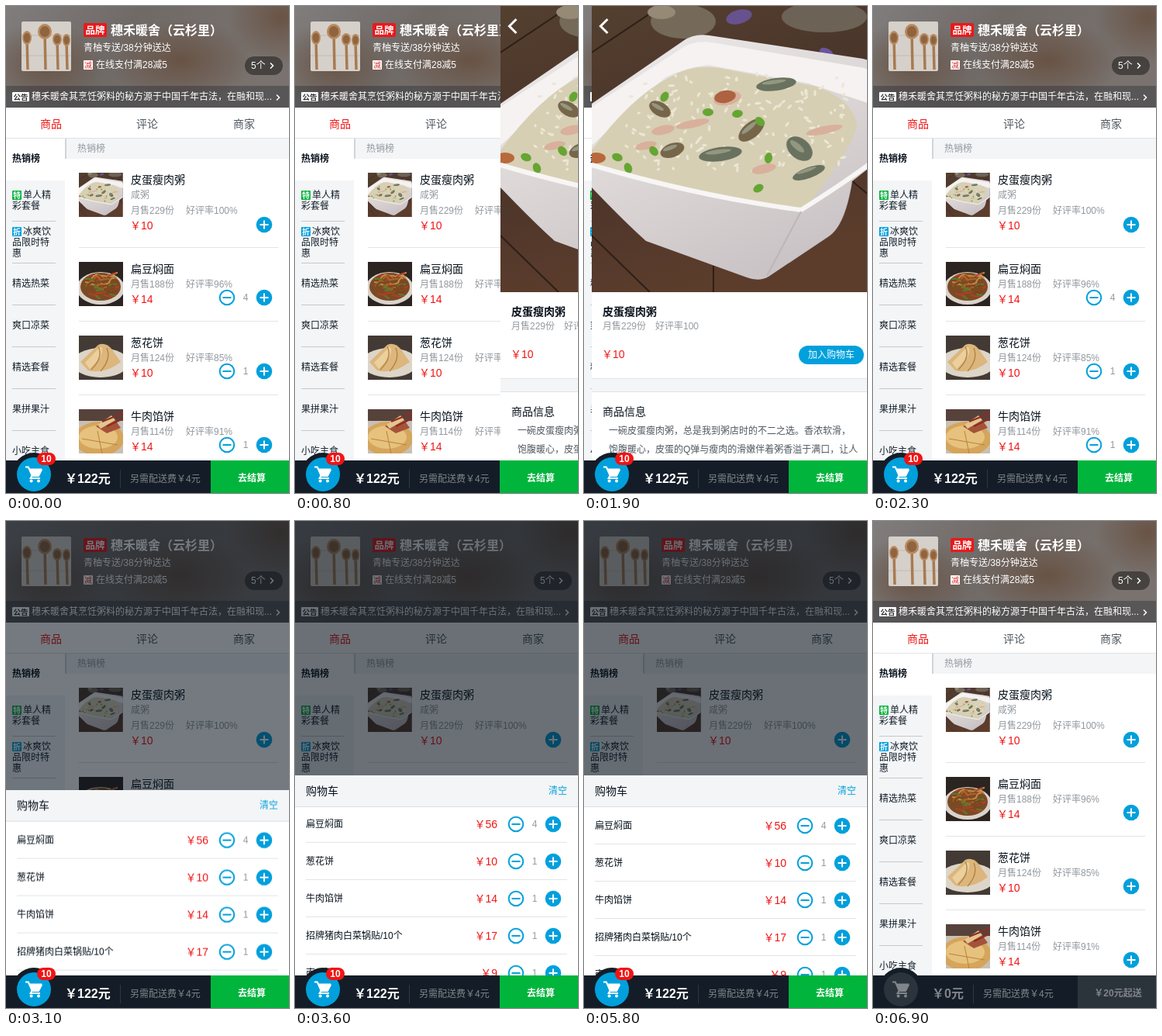
Write an HTML page that moves like this. It is 365 by 628 pixels and loops after 7.5 s.

```html
<!DOCTYPE html>
<html lang="zh-CN">
<head>
<meta charset="utf-8">
<title>外卖点餐</title>
<style>
html, body { margin: 0; width: 100%; height: 100%; overflow: hidden; background: #fff; }
svg { display: block; }
text { font-family: "Liberation Sans", "Noto Sans CJK SC", "Noto Sans CJK JP", sans-serif; white-space: pre; }
.b { font-weight: 700; }
.m { text-anchor: middle; }
.e { text-anchor: end; }

.detail, .mask, .cart, .rows, .full, .empty, .n0, .n1, .n2, .fly, .drop {
  animation: 7.5s linear infinite;
}
.detail { animation-name: detail; }
.mask { animation-name: mask; }
.cart { animation-name: cart; }
.rows { animation-name: rows; }
.full, .empty, .n0, .n1, .n2 { animation-timing-function: step-end; }
.full { animation-name: full; }
.empty { animation-name: empty; }
.n0 { animation-name: n0; }
.n1 { animation-name: n1; }
.n2 { animation-name: n2; }
.fly { opacity: 0; animation-name: fly; }
.drop { animation-name: drop; }
.second, .second .drop { animation-delay: .4s; }

@keyframes detail {
  0%, 9.2% { transform: translateX(365px); }
  14.6%, 25.2% { transform: none; }
  30.6%, 100% { transform: translateX(365px); }
}
@keyframes mask {
  0% { opacity: 0; }
  36.86% { opacity: 0; animation-timing-function: ease; }
  43.53% { opacity: 1; }
  87.95% { opacity: 1; animation-timing-function: ease-out; }
  91.85%, 100% { opacity: 0; }
}
@keyframes cart {
  0% { transform: translateY(258px); }
  36.86% { transform: translateY(258px); animation-timing-function: ease; }
  43.53%, 87.95% { transform: none; }
  87.96% { transform: translateY(217px); animation-timing-function: ease-out; }
  91.85%, 100% { transform: translateY(258px); }
}
@keyframes rows {
  0% { transform: none; }
  47.6% { transform: none; animation-timing-function: ease-in-out; }
  52% { transform: translateY(-119px); }
  53% { transform: translateY(-119px); animation-timing-function: ease-in-out; }
  57.3%, 58.5% { transform: none; }
  58.7% { transform: translateY(3px); }
  59.9%, 100% { transform: none; }
}
@keyframes full { 0% { opacity: 1; } 87.95%, 100% { opacity: 0; } }
@keyframes empty { 0% { opacity: 0; } 87.95%, 100% { opacity: 1; } }
@keyframes n0 { 0% { opacity: 1; } 62.6% { opacity: 0; } 77.3%, 100% { opacity: 1; } }
@keyframes n1 { 0% { opacity: 0; } 62.6% { opacity: 1; } 66.6% { opacity: 0; } 74.6% { opacity: 1; } 77.3%, 100% { opacity: 0; } }
@keyframes n2 { 0% { opacity: 0; } 66.6% { opacity: 1; } 74.6%, 100% { opacity: 0; } }
@keyframes fly {
  0%, 61.72% { opacity: 0; transform: translateX(321px); }
  61.73% { opacity: 1; transform: translateX(321px); }
  66% { opacity: 1; transform: translateX(40px); }
  66.01%, 100% { opacity: 0; transform: translateX(40px); }
}
@keyframes drop {
  0% { transform: translateY(424px); }
  61.73% { transform: translateY(424px); animation-timing-function: cubic-bezier(.333, -.27, .667, .516); }
  66%, 100% { transform: translateY(598px); }
}
</style>
</head>
<body>
<svg id="stage" width="365" height="628" viewBox="0 0 365 628">
  <defs>
    <linearGradient id="sky" x2="1" y2=".25">
      <stop offset="0" stop-color="#807d7d"/><stop offset=".45" stop-color="#706a67"/><stop offset="1" stop-color="#79726e"/>
    </linearGradient>
    <radialGradient id="blot">
      <stop offset="0" stop-color="#644a38" stop-opacity=".75"/><stop offset="1" stop-color="#644a38" stop-opacity="0"/>
    </radialGradient>
    <linearGradient id="wood" x2=".3" y2="1">
      <stop offset="0" stop-color="#54402f"/><stop offset=".5" stop-color="#49332a"/><stop offset="1" stop-color="#5c3d2c"/>
    </linearGradient>
    <linearGradient id="china" x2=".5" y2="1">
      <stop offset="0" stop-color="#efebea"/><stop offset="1" stop-color="#cbc4c6"/>
    </linearGradient>
    <clipPath id="list"><path d="M0 369h365v217H0z"/></clipPath>
    <clipPath id="thumb"><path d="M0 0h57v57H0z"/></clipPath>
    <clipPath id="photo"><path d="M0 0h365v369H0z"/></clipPath>
  </defs>
</svg>
<script>
const INK = '#07111b', GREY = '#93999f', RED = '#f01414', BLUE = '#00a0dc', PALE = '#f3f5f7', DIM = '#80858a';

let seed = 7;
const rnd = (a, b) => a + (b - a) * ((seed = seed * 16807 % 2147483647) / 2147483647);
const times = (n, f) => Array.from({ length: n }, (_, i) => f(i)).join('');

// Text is placed by the middle of its glyphs
const text = (x, y, size, fill, str, cls = '') =>
  `<text x="${x}" y="${y + size * .37}" font-size="${size}" fill="${fill}" class="${cls}">${str}</text>`;
const rect = (x, y, w, h, fill, r = 0) => `<rect x="${x}" y="${y}" width="${w}" height="${h}" rx="${r}" fill="${fill}"/>`;
const oval = (x, y, rx, ry, fill, turn = 0) =>
  `<ellipse cx="${x}" cy="${y}" rx="${rx}" ry="${ry}" fill="${fill}" transform="rotate(${turn} ${x} ${y})"/>`;
const shape = (d, fill) => `<path d="${d}" fill="${fill}"/>`;
const line = (d, stroke, w) => `<path d="${d}" fill="none" stroke="${stroke}" stroke-width="${w}"/>`;
const rule = (x1, x2, y, c = '#e1e4e6') => rect(x1, y, x2 - x1, 1, c);
const group = (cls, ...parts) => `<g class="${cls}">${parts.join('')}</g>`;
const at = (x, y, body) => `<g transform="translate(${x} ${y})">${body}</g>`;

const plus = y => oval(333, y, 10.3, 10.3, BLUE) + line(`M327.5 ${y}h11M333 ${y - 5.5}v11`, '#fff', 2);
const minus = y => `<circle cx="285" cy="${y}" r="9.3" fill="none" stroke="${BLUE}" stroke-width="2"/>` +
  line(`M279.5 ${y}h11`, BLUE, 2);
const count = (y, n) => text(309, y, 12, GREY, n, 'm');
const states = f => times(3, i => group('n' + i, f(i)));

function bowl() {
  const grains = times(170, () => {
    const x = rnd(45, 330), y = rnd(88, 215);
    return oval(x, y, rnd(2, 4.5), 1.6, '#ece7d4', rnd(0, 180));
  });
  const egg = [[88, 133, 15, 9, 30], [238, 101, 26, 8, -8], [166, 191, 28, 9, -8], [206, 160, 20, 10, -40],
    [268, 184, 19, 13, 40], [280, 215, 22, 7, -20], [104, 186, 16, 9, -20]];
  const leaf = [[150, 137], [80, 187], [228, 196], [215, 235], [33, 195], [47, 209], [94, 117], [188, 139], [217, 149]];
  const meat = [[175, 119, 18, 9], [92, 160, 15, 6], [222, 210, 16, 6], [300, 160, 24, 5], [130, 152, 22, 5], [70, 180, 14, 5]];
  return rect(0, 0, 365, 369, 'url(#wood)') +
    line('M0 296L75 369M157 335V369M335 225L365 250M0 60L90 0', '#2d1e18', 2) +
    oval(118, 20, 42, 22, '#75695a') + oval(300, 14, 55, 20, '#6d6256') + oval(90, 8, 18, 9, '#968a76') +
    oval(190, 14, 17, 9, '#67518f', -15) + oval(303, 61, 10, 6, '#6c549b', 30) +
    shape('M0 126L118 45Q132 35 152 38L350 68Q365 71 365 82V203L336 226Q327 283 306 297L228 349Q216 356 200 350L70 303Q42 278 0 234Z', 'url(#china)') +
    shape('M0 130L120 52Q135 44 155 47L352 80Q362 84 365 92V128L280 100L150 76Q120 80 95 92L0 180Z', '#f5f2f1') +
    shape('M0 186Q50 118 100 92Q130 74 165 80L290 104Q335 120 342 152Q340 180 274 262Q130 240 0 204Z', '#d6cfb4') +
    grains + meat.map(m => oval(...m, '#d9b09b', -12)).join('') + oval(172, 117, 14, 8, '#ad6242', -10) +
    egg.map((e, i) => oval(...e.slice(0, 4), i % 3 ? '#69725f' : '#77654a', e[4]) +
      oval(e[0] - 3, e[1] - 3, e[2] * .6, e[3] * .3, '#949780', e[4])).join('') +
    leaf.map(([x, y], i) => oval(x, y, 7, 5, '#65a532', i * 50)).join('') +
    oval(6, 196, 12, 7, '#b9683b') +
    line('M0 205Q140 246 270 263Q320 232 365 199', '#f8f5f5', 6) +
    line('M270 265L226 348', '#bdb5b8', 2);
}

function noodles() {
  const hues = ['#a8642c', '#7c431e', '#c58a45', '#5f7a2c', '#b0402a'];
  return rect(0, 0, 57, 57, '#2b2420') + oval(28, 34, 31, 21, '#d9d3cc') + oval(28, 32, 26, 18, '#7b4a24') +
    times(46, i => {
      const x = rnd(8, 42), y = rnd(17, 43);
      return line(`M${x} ${y}q${rnd(2, 6)} ${rnd(-9, 5)} ${rnd(6, 13)} ${rnd(-6, 6)}`, hues[i % 5], 2);
    });
}

const flatbread = () => rect(0, 0, 57, 57, '#433a35') + oval(28, 35, 36, 19, '#ddd5c8') +
  shape('M2 34L25 12Q34 8 42 17L54 34Q34 50 12 45Z', '#dcb67c') + shape('M8 35L27 15Q33 14 28 28L14 43Z', '#ebcf9c') +
  line('M25 14Q32 28 16 44M36 16Q42 30 28 46', '#b48448', 1.4);

const pie = () => rect(0, 0, 57, 57, '#c9bfb3') + rect(0, 0, 57, 15, '#57423b') + oval(26, 38, 32, 22, '#d5a55b') +
  oval(25, 36, 25, 15, '#e6c27e') + shape('M22 22L44 10L54 24L36 31Z', '#a45339') + shape('M24 20L42 8L47 14L28 25Z', '#e3c58e') +
  line('M57 5L30 16M57 12L36 22', '#8d2c25', 2.2) + line('M4 38L50 46M24 28L30 57', '#b9823b', 1);

const spoons = () => rect(0, 0, 64, 64, '#d6d0ca', 2) + line('M0 18H64M0 44H64', '#c3bbb4', 1) +
  [[7, 21, 6, 9], [30, 13, 9, 10], [46, 23, 6, 8], [58, 24, 5, 8]].map(([x, y, a, b]) =>
    line(`M${x} ${y}L${x + 1} 62`, '#a77b52', 3.5) + oval(x, y, a, b, '#b78a60') + oval(x, y, a * .7, b * .7, '#8f643f')).join('');

function header() {
  const white = '#fff';
  return rect(0, 0, 365, 131, 'url(#sky)') + oval(225, 70, 95, 55, 'url(#blot)') + oval(355, 15, 70, 60, 'url(#blot)') +
    oval(50, 75, 80, 55, 'url(#blot)') + rect(0, 103, 365, 28, 'rgba(7,17,27,.28)') +
    at(20, 20, spoons()) + rect(100, 22, 30, 18, '#e8191b', 2) + text(115, 31, 12.5, white, '品牌', 'b m') +
    text(135, 31, 16, white, '穗禾暖舍（云杉里）', 'b') + text(100, 54, 12, white, '青柚专送/38分钟送达') +
    rect(100, 70, 12, 12, white, 1) + text(106, 76, 10, '#e3362f', '减', 'm') + text(116, 76, 12, white, '在线支付满28减5') +
    rect(308, 65, 49, 24, 'rgba(0,0,0,.42)', 12) + text(316, 77, 12, white, '5个') + line('M341 73.5l3.5 3.5l-3.5 3.5', white, 1.5) +
    rect(8, 111, 22, 12, white, 1) + text(19, 117, 9.5, '#333', '公告', 'b m') +
    text(33, 117, 12, white, '穗禾暖舍其烹饪粥料的秘方源于中国千年古法，在融和现...') +
    line('M349 114.5l3.5 3.5l-3.5 3.5', white, 1.5);
}

const tabs = () => text(58, 152, 14, RED, '商品', 'm') + text(182, 152, 14, '#4d555d', '评论', 'm') +
  text(307, 152, 14, '#4d555d', '商家', 'm') + rule(0, 365, 170);

function menu() {
  const tag = (y, fill, s) => rect(8, y - 6, 12, 12, fill, 1) + text(14, y, 10, '#fff', s, 'b m');
  const dark = '#14202b';
  return rect(0, 171, 76, 415, PALE) + rect(0, 171, 76, 54, '#fff') + text(8, 197, 12, INK, '热销榜', 'b') +
    tag(244, '#00b43c', '特') + text(22, 244, 12, dark, '单人精') + text(8, 257.5, 12, dark, '彩套餐') +
    tag(291, BLUE, '折') + text(22, 291, 12, dark, '冰爽饮') + text(8, 304.5, 12, dark, '品限时特') + text(8, 318.5, 12, dark, '惠') +
    ['精选热菜', '爽口凉菜', '精选套餐', '果拼果汁', '小吃主食'].map((s, i) => text(8, 358 + 54 * i, 12, dark, s)).join('') +
    times(6, i => rule(8, 64, 277 + 54 * i, '#c6cace'));
}

function foods() {
  const list = [['皮蛋瘦肉粥', 229, 100, 10], ['扁豆焖面', 188, 96, 14, 4], ['葱花饼', 124, 85, 10, 1], ['牛肉馅饼', 114, 91, 14, 1]];
  const pics = [`<g transform="scale(.1555)">${bowl()}</g>`, noodles(), flatbread(), pie()];
  return rect(76, 171, 289, 26, PALE) + rect(76, 171, 2, 26, '#d0d5da') + text(92, 184, 12, GREY, '热销榜') +
    list.map(([name, sold, good, price, n], i) => {
      const y = i ? 235 + 95 * i : 215, low = i ? y : y + 20, knob = i ? y + 46 : 282;
      return at(94, y, `<g clip-path="url(#thumb)">${pics[i]}</g>`) + text(161, y + 9, 14, INK, name) +
        (i ? '' : text(161, 244, 12, GREY, '咸粥')) + text(161, low + 29, 12, GREY, `月售${sold}份`) +
        text(232, low + 29, 12, GREY, `好评率${good}%`) + text(160, low + 48, 14, RED, '￥' + price) +
        (n ? group('full', minus(knob), count(knob, n)) : '') + plus(knob) + rule(94, 351, 311 + 95 * i);
    }).join('');
}

const detail = () => group('detail', rect(0, 0, 365, 586, '#fff'), `<g clip-path="url(#photo)">${bowl()}</g>`,
  `<path d="M20.5 17L11.5 26L20.5 35" fill="none" stroke="#fff" stroke-width="3"/>`,
  text(14, 394, 14, INK, '皮蛋瘦肉粥', 'b'), text(14, 413, 12, GREY, '月售229份'), text(82, 413, 12, GREY, '好评率100'),
  text(13, 449, 14, RED, '￥10'), rect(267, 438, 84, 24, BLUE, 12), text(309, 450, 12, '#fff', '加入购物车', 'm'),
  rect(0, 480, 365, 18, PALE), rule(0, 365, 480), rule(0, 365, 497), text(14, 523, 14, INK, '商品信息'),
  text(22, 548, 12, '#4d555d', '一碗皮蛋瘦肉粥，总是我到粥店时的不二之选。香浓软滑，'),
  text(22, 572, 12, '#4d555d', '饱腹暖心，皮蛋的Q弹与瘦肉的滑嫩伴着粥香溢于满口，让人'));

function cart() {
  const items = [['扁豆焖面', 14, 4], ['葱花饼', 10, 1], ['牛肉馅饼', 14, 1], ['招牌猪肉白菜锅贴/10个', 17, 1],
    ['南瓜粥', 9, 1], ['红豆薏米美肤粥', 12, 1], ['八宝酱菜', 4, 1]];
  const rows = items.map(([name, price, n], i) => {
    const y = 393 + 48 * i;
    const sum = k => text(261, y, 14, RED, '￥' + price * k, 'e') + count(y, k);
    return text(14, y, 12, INK, name) + (i == 1 ? states(k => sum(n + k)) : sum(n)) + minus(y) + plus(y) + rule(14, 351, y + 23);
  }).join('');
  return group('cart', rect(0, 328, 365, 300, '#fff'), `<g clip-path="url(#list)">${group('rows', rows)}</g>`,
    rect(0, 328, 365, 40, PALE), rule(0, 365, 368, '#d9dde1'), text(14, 348, 14, INK, '购物车'), text(327, 348, 12, BLUE, '清空'));
}

function bar() {
  const trolley = c => at(36, 604, line('M-11 -9.5h3.8l5 11.5h8.2l4.2-8.5', c, 2) + shape('M-6.5 -7.5H10.5L6.3 1.5H-2.5Z', c) +
    line('M-2.4 1.5l-2 3.6H8', c, 2) + oval(-3.4, 8.6, 2, 2, c) + oval(6, 8.6, 2, 2, c));
  const fee = x => rect(x, 598, 1, 24, '#2f3740') + text(x + 13, 610, 12, DIM, '另需配送费￥4元');
  const ring = oval(36, 604, 28, 28, '#141d27');
  return rect(0, 586, 365, 42, '#141d27') + ring +
    group('full', oval(36, 604, 22, 22, BLUE), trolley('#fff'), rect(40, 576, 24, 16, RED, 8),
      states(i => text(52, 584, 12, '#fff', 10 + i, 'b m') + text(76, 609, 16, '#fff', `￥${122 + 10 * i}元`, 'b')),
      fee(147), rect(264, 586, 101, 42, '#00b43c'), text(317, 609, 12, '#fff', '去结算', 'b m')) +
    group('empty', oval(36, 604, 22, 22, '#2b343c'), trolley(DIM), text(76, 609, 16, DIM, '￥0元', 'b'),
      fee(129), rect(264, 586, 101, 42, '#2b333b'), text(316, 609, 12, DIM, '￥20元起送', 'b m'));
}

const ball = cls => group('fly ' + cls, group('drop', oval(0, 0, 8, 8, BLUE)));

document.getElementById('stage').insertAdjacentHTML('beforeend',
  header() + tabs() + menu() + foods() + detail() +
  group('mask', rect(0, 0, 365, 628, 'rgba(7,17,27,.6)')) + cart() + bar() + ball('') + ball('second'));
</script>
</body>
</html>
```
